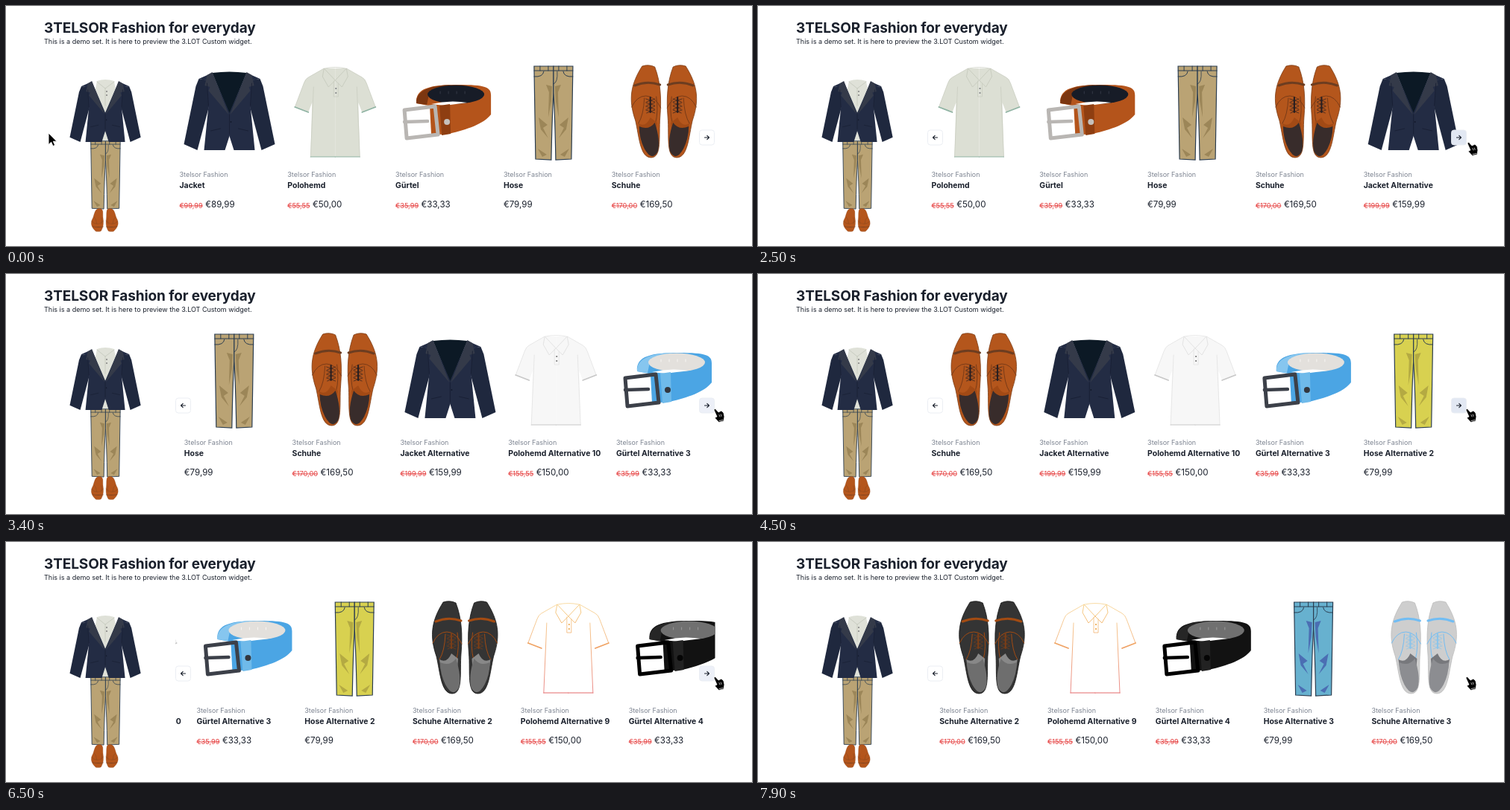
An HTML page for the animation above (8 s loop, 1000 by 323 pixels).

```html
<!DOCTYPE html>
<html lang="de">
<head>
<meta charset="utf-8">
<title>Fashion carousel</title>
<style>
  html, body { margin: 0; width: 100%; height: 100%; overflow: hidden; background: #fff; }
  svg { display: block; width: 100%; height: 100%; font-family: Inter, "Liberation Sans", sans-serif; fill: #1a202c; }
  .title { font-size: 19px; font-weight: 700; letter-spacing: -.1px; }
  .sub, .brand { font-size: 9px; }
  .brand { fill: #7d8491; }
  .name { font-size: 10.45px; font-weight: 700; }
  .price { font-size: 11.6px; }
  .old { font-size: 9.2px; fill: #e53e3e; text-decoration: line-through; }
  .line { fill: none; stroke-linecap: round; stroke-linejoin: round; }
</style>
</head>
<body>
<svg viewBox="0 0 1000 323">
  <defs>
    <clipPath id="view"><rect x="227" y="70" width="723.5" height="220"/></clipPath>
    <linearGradient id="warm" gradientUnits="userSpaceOnUse" x1="0" y1="83" x2="0" y2="204">
      <stop offset="0" stop-color="#f7d28c"/><stop offset=".45" stop-color="#f0a463"/><stop offset="1" stop-color="#e4696b"/>
    </linearGradient>
  </defs>
  <text class="title" x="51" y="36">3TELSOR Fashion for everyday</text>
  <text class="sub" x="51" y="51">This is a demo set. It is here to preview the 3.LOT Custom widget.</text>
  <g id="outfit"></g>
  <g clip-path="url(#view)"><g id="track"></g></g>
  <g id="prev"></g>
  <g id="next"></g>
  <path id="arrow" d="M0 0V15.500L3.600 12.200 6 17.500 8.600 16.300 6.300 11.200H11Z" fill="#000" stroke="#fff" stroke-width=".9"/>
  <g id="hand">
    <path d="M0 2Q0 0 2 .5L6 5 10 3 13 6 14 11 13 17 6.500 18.500 1 12.500 4 11Z" fill="#000" stroke="#fff" stroke-width=".8"/>
    <path class="line" d="M7 8.500l1 2.500M9.300 8l.8 2.500M7 16.500l5-1" stroke="#fff" stroke-width=".7"/>
  </g>
</svg>
<script>
const $ = id => document.getElementById(id);
const shape = (d, fill, edge = 'none', w = 1) => `<path d="${d}" fill="${fill}" stroke="${edge}" stroke-width="${w}"/>`;
const line = (d, stroke, w = 1) => `<path class="line" d="${d}" stroke="${stroke}" stroke-width="${w}"/>`;
const dot = (x, y, r, fill) => `<circle cx="${x}" cy="${y}" r="${r}" fill="${fill}"/>`;
const place = (x, y, sx, sy, art) => `<g transform="translate(${x} ${y}) scale(${sx} ${sy})">${art}</g>`;
const mirror = (axis, half) => half + place(2 * axis, 0, -1, 1, half);

// Garments share card coordinates: x from the card's left edge, y on the stage.
function jacket(back = true) {
  return (back ? shape('M44 90Q67 87 90 90L67 146Z', '#0c1925') : '') + mirror(67,
    shape('M26 98L22 108 6 186 24 194 40 134V100Z', '#1f283e') +
    shape('M26 98L44 90 68 146V172L61 194H33L39 134 36 100Z', '#232c44') +
    shape('M44 89L37 93 34 107 41 109 39 114 66 146Z', '#343a49') +
    line('M37 104L39 134M42 168L55 165', '#171e31', .8)
  ) + line('M67 146V172', '#171e31', .8) + dot(69, 156, .9, '#111728');
}

function polo(fill, edge, hem, button) {
  return mirror(64,
    shape('M64 84H49L28 96Q24 98 22 104L10 136 28 143 33 130 31 203H64Z', fill) +
    line('M49 84L28 96Q24 98 22 104L10 136M35 109L31 203', edge, .8) +
    line('M10 136L28 143', hem, 1.8) + line('M31 203H64', hem, 1.2) +
    shape('M49 84L47 95 55 109 64 100Z', fill, edge)
  ) + line('M50 84Q64 81 78 84M62 101V122H68V104', edge, .8) +
    dot(65, 111, 1.1, button) + dot(65, 117, 1.1, button);
}

function belt(main, fold, inner, hole, buckle, loop, stud) {
  const holes = [60, 71, 82, 93].map(x => line(`M${x} 115v3`, hole)).join('');
  return shape('M28 131C26 110 48 106 84 106S128 109 128 120V146C118 159 96 166 72 172L44 174V134Z', main) +
    shape('M28 131C27 112 50 107 75 106L46 114 42 133Z', fold) +
    `<ellipse cx="81" cy="119" rx="38" ry="12.500" fill="${inner}"/>${holes}` +
    shape('M48 132Q72 126 96 130L66 134Z', '#fff') +
    shape('M14 139L46 136 48 174 17 177Z', '#fff') +
    shape('M59 134L73 132 74 172 62 174Z', loop) + dot(69, 156, 4, stud) +
    line('M12 140L53 135 57 173 15 178Z', buckle, 5) +
    line('M12 156L43 155', buckle, 4.5);
}

function trousers(fill, fold) {
  const ink = '#2b3d50';
  return mirror(67,
    shape('M67 81H41L43 206 64 207Q65 150 67 117Z', fill, ink, 1.2) +
    shape('M65 108L57 106 61 116 60 150 64 128ZM47 150L59 160 53 164 60 178 50 166ZM46 192L58 200 52 203Z', fold) +
    line('M41 87H67M41 95Q53 96 54 88M49 81v6M60 81v6', ink)
  ) + line('M67 105Q73 103 72 88', ink, .8);
}

function shoes(main, band, seam, lace, tongue, inside, edge, bandWidth = 3) {
  const rungs = [125, 130, 135, 140].map(y => line(`M46 ${y}L58 ${y + 4}M58 ${y}L47 ${y + 4}`, lace, .7)).join('');
  return mirror(70.250,
    shape('M41 81Q50 78 58 82C66 103 67 125 65 150S68 204 53 204 37 175 32 154C22 125 26 105 41 81Z', main, edge, .8) +
    line('M31 107Q48 100 65 106', band, bandWidth) +
    line('M27 136Q34 121 46 121T66 137M36 158Q43 147 44 124M59 157Q63 142 60 122', seam) +
    line('M52 123V143', lace, 2.2) + rungs +
    shape('M36 158Q46 164 52 150L61 157 60 171 38 172Z', tongue) +
    shape('M37 162Q50 168 58 157 66 181 62 196 54 210 44 192 37 178 37 162Z', inside));
}

const tan = ['#baa374', '#9c8658'];
const kinds = {
  Jacket: { draw: jacket, price: '89,99', old: '99,99' },
  Polohemd: { draw: polo, price: '50,00', old: '55,55' },
  Gürtel: { draw: belt, price: '33,33', old: '35,99' },
  Hose: { draw: trousers, price: '79,99' },
  Schuhe: { draw: shoes, price: '169,50', old: '170,00' }
};
// Kind, suffix, colours and, where they change, prices.
const items = [
  ['Jacket', '', []],
  ['Polohemd', '', ['#dcdfd4', '#c9cdc0', '#8fb3a3', '#7b7f80']],
  ['Gürtel', '', ['#b4541b', '#7c3610', '#171c27', '#343947', '#b9b6b3', '#8e3e11', '#c6c1bc']],
  ['Hose', '', tan],
  ['Schuhe', '', ['#b4561c', '#6d3d20', '#793b18', '#2c2020', '#a24a15', '#382c2b', '#7b3c15']],
  ['Jacket', ' Alternative', [], { price: '159,99', old: '199,99' }],
  ['Polohemd', ' Alternative 10', ['#f7f7f7', '#e3e3e3', '#c8c8c8', '#777'], { price: '150,00', old: '155,55' }],
  ['Gürtel', ' Alternative 3', ['#4ba5e4', '#86c6ef', '#e3e0dc', '#f7f5f2', '#3c4049', '#6fbaea', '#33373f']],
  ['Hose', ' Alternative 2', ['#d8d150', '#b4aa42']],
  ['Schuhe', ' Alternative 2', ['#343434', '#a34b12', '#a34b12', '#7a3e18', '#888', '#6e6e6e', '#151515']],
  ['Polohemd', ' Alternative 9', ['#fff', 'url(#warm)', 'url(#warm)', '#eda545'], { price: '150,00', old: '155,55' }],
  ['Gürtel', ' Alternative 4', ['#121212', '#262626', '#707070', '#999', '#000', '#222', '#050505']],
  ['Hose', ' Alternative 3', ['#67b1cf', '#4b6eb3']],
  ['Schuhe', ' Alternative 3', ['#cecece', '#72bdf3', '#72bdf3', '#8cc4ea', '#77787c', '#8c8d91', '#bcbcbc']]
];

const STEP = 144.8, LEFT = 232.5;
$('track').innerHTML = items.map(([kind, suffix, colours, change], i) => {
  const { draw, price, old } = { ...kinds[kind], ...change };
  return place(i * STEP, 0, 1, 1, `${draw(...(colours.length ? colours : [true]))}
    <text class="brand" y="230">3telsor Fashion</text>
    <text class="name" y="244.500">${kind}${suffix}</text>
    <text y="271">${old ? `<tspan class="old" y="272">€${old}</tspan>` : ''}<tspan class="price" y="271" dx="${old ? 3.5 : 0}">€${price}</tspan></text>`);
}).join('');

const leather = '#b4561c', stitch = '#6d3d20';
$('outfit').innerHTML =
  place(82.5, 123, .76, .725, trousers(...tan)) +
  place(103.5, 323.5, .41, -.25, shoes(leather, stitch, stitch, leather, leather, leather, '#8a4014')) +
  shape('M122 101Q133 97 145 101L150 130 139 181H127L116 130Z', '#dfe1d8') +
  line('M122 102L133 111 145 102M133 111V134', '#c3c7bb', .8) +
  dot(135, 115, .9, '#777') + dot(135, 120, .9, '#777') +
  place(80.8, 31.6, .78, .78, jacket(false));

// dir is -1 for a left arrow, 1 for a right one.
const button = (cx, dir) => `<rect x="${cx - 10}" y="167" width="20" height="20" rx="3.500" fill="#fff" fill-opacity=".1" stroke="#e9ecf2" stroke-width=".9"/>` +
  line(`M${cx - 3 * dir} 177h${6 * dir}m${-2.7 * dir} -2.700l${2.7 * dir} 2.700l${-2.7 * dir} 2.700`, '#1a202c', 1.1);
$('prev').innerHTML = button(237.5, -1);
$('next').innerHTML = button(939.5, 1);
const nextBox = $('next').firstChild;

const LOOP = 8000, TICK = 100, GLIDE = 270;
const clicks = [1880, 2550, 3164, 3850, 4560, 5498, 6298, 7000, 7675];
const clamp = v => Math.max(0, Math.min(1, v));
const ease = v => v * v * (3 - 2 * v);
const show = (id, on) => $(id).setAttribute('visibility', on ? 'visible' : 'hidden');
const move = (id, x, y) => $(id).setAttribute('transform', `translate(${x} ${y})`);

function draw(t) {
  const scroll = clicks.reduce((sum, c) => sum + ease(clamp((t - c) / GLIDE)), 0);
  move('track', LEFT - scroll * STEP, 0);

  // The pointer arcs over the heading, then settles on the next button.
  const s = 1 - (1 - clamp(t / 1500)) ** 2;
  const settle = ease(clamp((t - 2500) / 500));
  const x = 57 + 894 * s - 2 * settle;
  const y = 171 * (1 - s) ** 2 - 230 * s * (1 - s) + 183 * s * s - 2 * settle;
  const hover = x > 929;
  move('arrow', x, y);
  move('hand', x, y);
  show('arrow', !hover);
  show('hand', hover);

  const pressed = clicks.some(c => t >= c - 80 && t < c);
  show('prev', t > clicks[0]);
  show('next', t < clicks.at(-1));
  nextBox.setAttribute('fill', pressed ? '#e2e8f3' : hover ? '#edf0f8' : '#fff');
  nextBox.setAttribute('fill-opacity', hover ? 1 : .1);
}

const start = performance.now();
function frame() {
  const t = (performance.now() - start) % LOOP;
  draw(Math.floor(t / TICK) * TICK);
  requestAnimationFrame(frame);
}
frame();
</script>
</body>
</html>
```
